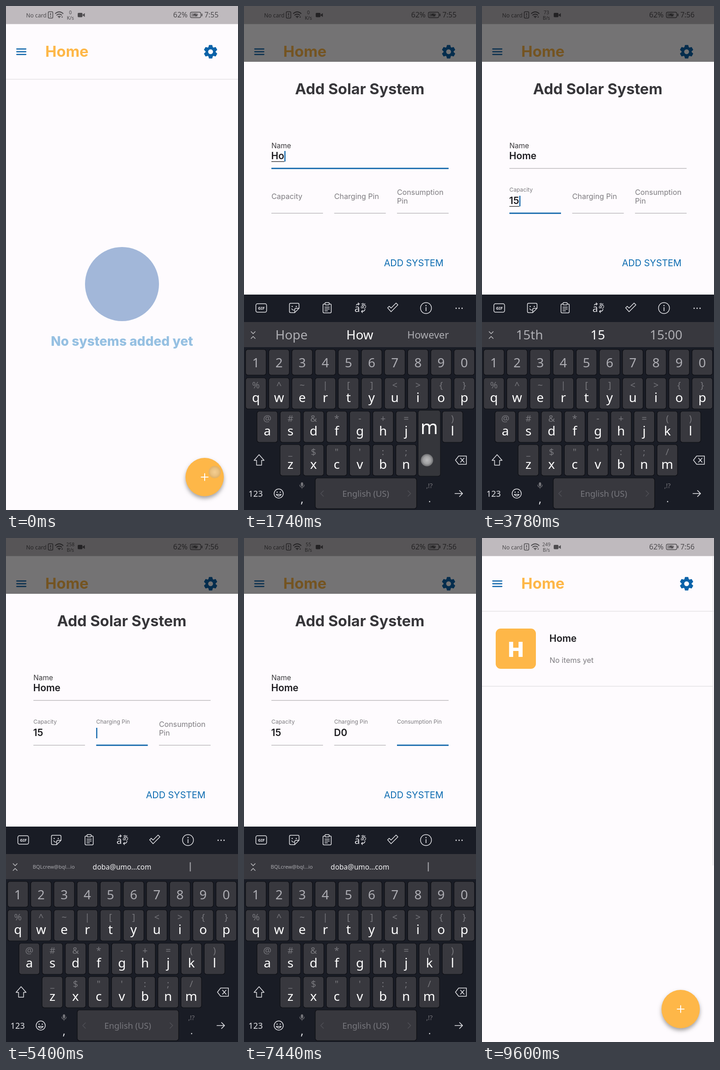
Write an HTML page with a canvas that moves like this. It is 508 by 1102 pixels and loops after 9660 ms.

```html
<!DOCTYPE html>
<html lang="en">
<head>
<meta charset="utf-8">
<title>Add a solar system</title>
<style>
html, body { margin: 0; width: 100%; height: 100%; overflow: hidden; background: #fefbfe; }
canvas { display: block; }
</style>
</head>
<body>
<canvas id="stage" width="508" height="1102"></canvas>
<script>
const W = 508, H = 1102, LOOP = 9660;
const ORANGE = '#feb748', BLUE = '#0b63a9', PAPER = '#fefbfe', GREY = '#7e7c80';
const STATUS = '#4d4b4e', KEY = '#38383e', BOARD = '#191c25', ICON = '#e4e4e8', HINT = '#77777c';

const screen = document.getElementById('stage').getContext('2d');
const layer = document.createElement('canvas');
layer.width = W;
layer.height = H;
const board = layer.getContext('2d');
let ctx = screen;

// Timeline, in ms
const CLOSE = 9060;
const fields = [
  { label: 'Name', x: 60, w: 388, line: 355, focus: 600 },
  { label: 'Capacity', x: 60, w: 113, line: 453, focus: 2640 },
  { label: 'Charging Pin', x: 197.5, w: 113, line: 453, focus: 4080 },
  { label: 'Consumption Pin', x: 335, w: 113, line: 453, focus: 6720 }
];
const strokes = [
  [1260, 'H', 0], [1560, 'o', 0], [1800, 'm', 0], [2040, 'e', 0],
  [3240, '1', 1], [3540, '5', 1],
  [5940, 'D', 2], [6300, '0', 2],
  [7800, 'D', 3], [8160, '1', 3]
];
const shifts = [[960, 1260], [5640, 5940], [7500, 7800]];
const speeds = [[0, '0', 'K/s'], [2400, '73', 'B/s'], [4800, '258', 'B/s'], [7080, '55', 'B/s'], [9300, '249', 'B/s']];
const suggestions = {
  H: ['Hi', 'How', 'Have'], Ho: ['Hope', 'How', 'However'], Hom: ['Homes', 'Home', 'Homework'],
  Home: ['Homes', 'Home', 'Homework'], 1: ['1st', '1', '10'], 15: ['15th', '15', '15:00'],
  D: ['Do', 'D', 'Day'], D0: ['D0', 'D0', 'Do'], D1: ['D1', 'D1', 'Do']
};
const taps = [
  [-60, 180, 457, 1019], [860, 960, 33, 993], [2520, 2640, 115, 430], [3960, 4080, 252, 430],
  [5540, 5640, 33, 993], [6600, 6720, 390, 430], [7400 + 50, 7550, 33, 993], [8820, 8980, 380, 562]
];

const rows = [
  { y: 751, h: 56, x: 26, keys: '1234567890' },
  { y: 813, h: 68, x: 26, keys: 'qwertyuiop', hints: '%^~|[]<>{}' },
  { y: 886, h: 68, x: 51, keys: 'asdfghjkl', hints: '@#&*-+=()' },
  { y: 959, h: 68, x: 101.5, keys: 'zxcvbnm', hints: '_$"\':;/' }
];
const keyAt = char => {
  const row = rows.find(r => r.keys.includes(char.toLowerCase()));
  return { x: row.x + 50.7 * row.keys.indexOf(char.toLowerCase()), y: row.y, h: row.h };
};
for (const [time, char] of strokes) {
  const key = keyAt(char);
  taps.push([time - 160, time, key.x - 5, key.y + 34]);
}

// Drawing helpers
const clamp = v => Math.max(0, Math.min(1, v));
const ramp = (t, start, length) => clamp((t - start) / length);
const easeOut = p => 1 - (1 - p) ** 3;
const inter = (size, weight = 400) => `${weight} ${size}px Inter, sans-serif`;
const noto = (size, weight = 400) => `${weight} ${size}px "Noto Sans", sans-serif`;

function text(str, x, y, font, color, align = 'left') {
  ctx.font = font;
  ctx.fillStyle = color;
  ctx.textAlign = align;
  ctx.fillText(str, x, y);
}
function rect(x, y, w, h, color, r = 0) {
  ctx.fillStyle = color;
  ctx.beginPath();
  ctx.roundRect(x, y, w, h, r);
  ctx.fill();
}
function circle(x, y, r, color) {
  ctx.fillStyle = color;
  ctx.beginPath();
  ctx.arc(x, y, r, 0, 7);
  ctx.fill();
}
function stroke(path, color, width = 1.5) {
  ctx.strokeStyle = color;
  ctx.lineWidth = width;
  ctx.lineCap = ctx.lineJoin = 'round';
  ctx.stroke(new Path2D(path));
}
function frame(x, y, w, h, r, color, width = 1.5) {
  ctx.strokeStyle = color;
  ctx.lineWidth = width;
  ctx.beginPath();
  ctx.roundRect(x, y, w, h, r);
  ctx.stroke();
}
function ring(x, y, r, color, width = 1.5) {
  frame(x - r, y - r, 2 * r, 2 * r, r, color, width);
}

function statusBar(t) {
  rect(0, 0, W, 39.5, '#bfbabe');
  text('No card', 44, 24.5, noto(12.2), STATUS);
  frame(92.5, 12.5, 10, 14, 2, STATUS);
  rect(96.7, 15.5, 1.7, 5, STATUS);
  rect(96.7, 22, 1.7, 2, STATUS);
  stroke('M108 16.5Q116.500 9 125 16.500M111 20Q116.500 15.500 122 20M114 23.200Q116.500 21.500 119 23.200', STATUS, 1.7);
  circle(116.5, 25, 1.3, STATUS);
  circle(123, 24, 1.3, STATUS);
  const [, amount, unit] = speeds.findLast(s => t >= s[0]);
  text(amount, 141, 17.5, noto(10.5), STATUS, 'center');
  text(unit, 141, 30, noto(10.5), STATUS, 'center');
  rect(157, 15, 10.5, 9.5, STATUS, 2);
  ctx.fill(new Path2D('M168 19l4.500-3.500v8.500l-4.500-3.500z'));
  text('62%', 366, 25, noto(16), STATUS);
  frame(403.500, 13.5, 23, 12, 3, STATUS, 1.3);
  rect(405.500, 15.5, 14, 8, '#8f8b8f', 1);
  rect(428, 16.5, 2, 6, STATUS, 1);
  ctx.fill(new Path2D('M408 20l7-4v2.500h6l-6 5v-2.500z'));
  text(t < 2400 ? '7:55' : '7:56', 434.5, 25, noto(15.5), STATUS);
}

function gear(x, y) {
  ctx.save();
  ctx.translate(x, y);
  circle(0, 0, 11, BLUE);
  for (let i = 0; i < 6; i++) {
    const tooth = new Path2D('M-4.500 -8L-3 -14H3L4.500 -8Z');
    ctx.fill(tooth);
    ctx.lineJoin = 'round';
    ctx.lineWidth = 1.5;
    ctx.strokeStyle = BLUE;
    ctx.stroke(tooth);
    ctx.rotate(Math.PI / 3);
  }
  circle(0, 0, 5.3, PAPER);
  ctx.restore();
}

function home(t) {
  rect(0, 0, W, H, PAPER);
  statusBar(t);
  stroke('M23.500 94H43.500M23.500 100H43.500M23.500 106H43.500', BLUE, 2.3);
  text('Home', 86, 111, inter(33, 700), ORANGE);
  gear(448, 100);
  rect(0, 159.5, W, 1.5, '#e5e3e6');

  if (t < CLOSE) {
    circle(254, 608, 81, '#a2b7d9');
    text('No systems added yet', 254, 743, inter(28.4, 800), '#96c0e2', 'center');
  } else {
    rect(30, 198, 88, 88, ORANGE, 11);
    text('H', 74, 260, inter(45, 900), '#fff', 'center');
    text('Home', 147.500, 227, inter(21, 600), '#1d1c20');
    text('No items yet', 148, 272.5, inter(16.3), GREY);
    rect(0, 323.5, 506, 1.5, '#e5e3e6');
    rect(505, 40, 1.5, 676, '#e6e4e8');
  }

  ctx.save();
  ctx.shadowColor = 'rgba(0,0,0,.35)';
  ctx.shadowBlur = 9;
  ctx.shadowOffsetY = 5;
  circle(435, 1030, 42, ORANGE);
  ctx.restore();
  stroke('M427.500 1030H442.500M435 1022.500V1037.500', '#fff', 2);
}

function fieldState(t) {
  const active = fields.findLastIndex(f => t >= f.focus);
  const typed = i => strokes.filter(s => s[2] === i && t >= s[0]).map(s => s[1]).join('');
  return { active, typed };
}

function formField(field, i, t, { active, typed }) {
  const { x, w, line } = field, value = typed(i), focused = i === active;
  if (i === 0) {
    text(field.label, x, 311, inter(15.5), '#3a393c');
  } else {
    const p = easeOut(ramp(t, field.focus, 180));
    const size = 16.2 - 4 * p;
    if (i === 3 && p < .5) {
      text('Consumption', x, 413, inter(size), GREY);
      text('Pin', x, 432, inter(size), GREY);
    } else {
      text(field.label, x, 422 - 16 * p, inter(size), GREY);
    }
  }
  const base = line - 20;
  text(value, x - .5, base, inter(21, 600), '#1d1c20');
  const width = ctx.measureText(value).width;
  if (!focused) {
    rect(x, line - .5, w, 1.2, '#b0aeb1');
    return;
  }
  rect(x, line - 1.3, w, 2.7, BLUE);
  if (value) rect(x, base + 4.500, width, 1.4, '#333');
  const since = Math.max(field.focus, ...strokes.filter(s => t >= s[0]).map(s => s[0]));
  if ((t - since) % 1000 < 500) rect(x + width, base - 18, 2.4, 23, BLUE);
}

function sheet(t, top, state) {
  ctx.save();
  ctx.translate(0, top - 122);
  rect(0, 122, W, H, PAPER);
  text('Add Solar System', 253.5, 193, inter(32.7, 700), '#37363a', 'center');
  fields.forEach((field, i) => formField(field, i, t, state));
  text('ADD SYSTEM', 306.500, 569, inter(20), '#0b6bb0');
  ctx.restore();
}

function toolbar() {
  frame(26, 651, 23.5, 18.500, 3.5, ICON);
  text('GIF', 38, 663.5, noto(9, 700), ICON, 'center');
  stroke('M102 650H118Q120.500 650 120.500 652.500V661L111 670.500H102Q99.500 670.500 99.500 668V652.500Q99.500 650 102 650M120 661H113.500Q111 661 111 664V670M104.500 662Q106 665 109 665', ICON);
  circle(105.5, 657, 1.3, ICON);
  circle(114.5, 657, 1.3, ICON);
  frame(173, 651.5, 18, 19.5, 2.500, ICON);
  rect(177.5, 648.5, 9, 5.5, BOARD);
  frame(177.5, 648.5, 9, 5, 1, ICON);
  stroke('M177 658.500H187M177 662.500H187M177 666.500H183', ICON, 1.3);
  text('a', 242, 668.5, noto(21), ICON);
  text('あ', 254.5, 659.5, '14px "Noto Sans CJK JP", "Noto Sans CJK", sans-serif', ICON);
  stroke('M246 654Q247 651 252 651.500M250 649l2.500 2.500-2.500 2.500M265 663Q264 668 257 668M259.500 665.500l-2.500 2.500 2.500 2.500', ICON, 1.4);
  stroke('M314.500 660l3.500-3.500 4 4 11-11 4 4-15 15z', ICON);
  ring(398.5, 660.5, 12, ICON);
  rect(397.7, 658.5, 1.7, 8.5, ICON);
  circle(398.5, 655, 1.3, ICON);
  for (const x of [464.5, 471, 477.5]) circle(x, 661, 1.4, ICON);
}

function suggestionRow(value) {
  rect(0, 691, W, 55, KEY);
  stroke('M15.500 712l4.500 4.500 4.500-4.500M15.500 727l4.500-4.500 4.500 4.500', '#c4c4c8', 1.4);
  if (!value) {
    text('BQLcrew@bql...io', 104.5, 723, noto(11.2), '#a9a9ae', 'center');
    text('doba@umo...com', 254, 724.5, noto(15.5), '#f2f2f4', 'center');
    rect(402.5, 709, 2, 20, '#a9a9ae');
    return;
  }
  suggestions[value].forEach((word, i) => {
    const size = word.length > 5 ? 22 : 28;
    text(word, 104 + 149.500 * i, size === 28 ? 729 : 727, noto(size, i === 1 ? 500 : 400), i === 1 ? '#fff' : '#aeaeb3', 'center');
  });
}

function keycap(x, y, w, h) {
  rect(x - w / 2, y, w, h, KEY, 5);
  frame(x - w / 2, y, w, h, 5, '#0d0e13', 1.2);
}

function letterKeys(t) {
  const upper = shifts.some(([from, to]) => t >= from && t < to);
  for (const row of rows) {
    [...row.keys].forEach((char, i) => {
      const x = row.x + 50.7 * i;
      keycap(x, row.y, 45, row.h);
      if (!row.hints) return text(char, x, row.y + 39, noto(28), '#adadb3', 'center');
      text(row.hints[i], x, row.y + 23, noto(20), HINT, 'center');
      text(upper ? char.toUpperCase() : char, x, row.y + 53, noto(28), '#fff', 'center');
    });
  }
  stroke('M33 981L44 993.500H38.500V1004H27.500V993.500H22Z', ICON);
  if (upper) {
    ctx.fillStyle = ICON;
    ctx.fill(new Path2D('M33 981L44 993.500H38.500V1004H27.500V993.500H22Z'));
  }
  stroke('M463 993l7-9H487V1002H470ZM474 988.500l8 9M482 988.500l-8 9', ICON);
}

function bottomKeys() {
  text('123', 25.5, 1073, noto(18.3), ICON, 'center');
  ring(76, 1066, 10, ICON);
  circle(72.5, 1063, 1.3, ICON);
  circle(79.5, 1063, 1.3, ICON);
  stroke('M70.500 1068Q76 1075 81.500 1068Z', ICON, 1.3);
  rect(124.5, 1041.5, 5, 8.500, HINT, 2.5);
  stroke('M122 1047Q122 1052 127 1052T132 1047M127 1052V1055', HINT, 1.2);
  text(',', 127, 1087, noto(25), ICON, 'center');
  keycap(267, 1032, 222, 67);
  stroke('M174 1060l-6 6 6 6M359 1060l6 6-6 6', '#515157', 1.3);
  text('English (US)', 266.5, 1073, noto(18.5), '#77777d', 'center');
  text(',!?', 406, 1054, noto(14.5), HINT, 'center');
  text('.', 406.5, 1085, noto(20), ICON, 'center');
  stroke('M462 1066H478.500M472 1059.500L478.500 1066L472 1072.500', ICON, 1.7);
}

function popup(t) {
  const pressed = strokes.find(([time]) => t >= time - 160 && t < time);
  if (!pressed) return;
  const { x, y, h } = keyAt(pressed[1]);
  rect(x - 24.5, y - 75, 49, h + 76, '#35363b', 5);
  frame(x - 24.5, y - 75, 49, h + 76, 5, '#111217', 1.2);
  text(pressed[1], x, y - 23, noto(41), '#fff', 'center');
}

function keyboard(t, shown, { active, typed }) {
  ctx = board;
  ctx.clearRect(0, 0, W, H);
  rect(0, 631, W, H - 631, BOARD);
  toolbar();
  suggestionRow(active < 0 ? '' : typed(active));
  letterKeys(t);
  bottomKeys();
  popup(t);
  ctx = screen;
  ctx.globalAlpha = shown;
  ctx.drawImage(layer, 0, (1 - shown) * 105);
  ctx.globalAlpha = 1;
}

function touches(t) {
  for (const [from, to, x, y] of taps) {
    const strength = Math.min(ramp(t, from, 130), 1 - ramp(t, to, 80));
    if (t < from || strength <= 0) continue;
    const glow = ctx.createRadialGradient(x, y, 0, x, y, 14);
    glow.addColorStop(0, 'rgba(235,235,235,.95)');
    glow.addColorStop(.6, 'rgba(205,205,205,.9)');
    glow.addColorStop(1, 'rgba(160,160,160,.65)');
    ctx.globalAlpha = strength;
    circle(x, y, 13.5, glow);
    ctx.globalAlpha = 1;
  }
}

function render(t) {
  const state = fieldState(t);
  const closing = ramp(t, CLOSE, 250);
  home(t);

  const scrim = ramp(t, 220, 240) * (1 - closing);
  if (scrim > 0) rect(0, 0, W, H, `rgba(0,0,0,${.54 * scrim})`);

  const opened = easeOut(ramp(t, 220, 260));
  const lifted = easeOut(ramp(t, 640, 120));
  const top = H - 509 * opened - 471 * lifted + 980 * closing ** 1.5;
  if (top < H) sheet(t, top, state);

  const shown = ramp(t, 560, 160) * (1 - ramp(t, CLOSE, 180));
  if (shown > 0) keyboard(t, shown, state);
  touches(t);
}

const start = performance.now();
function tick() {
  render((performance.now() - start) % LOOP);
  requestAnimationFrame(tick);
}
tick();
</script>
</body>
</html>
```
